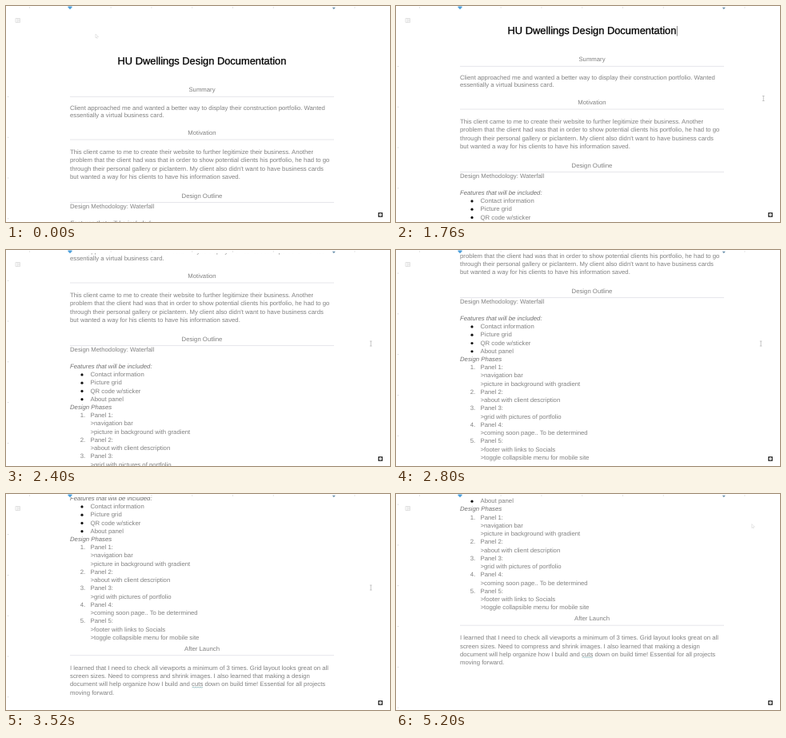
These frames come from a looping animation (480 by 270 pixels, 5280 ms). An HTML page:

```html
<!DOCTYPE html>
<html lang="en">
<head>
<meta charset="utf-8">
<title>Design Documentation</title>
<style>
  html, body { margin: 0; width: 100%; height: 100%; overflow: hidden; background: #fff; }
  svg { display: block; width: 480px; height: 270px; }
  text { font: 7.76px "Liberation Sans", Arial, sans-serif; fill: #808080;
         text-rendering: geometricPrecision; white-space: pre; }
  .title { font-size: 12.87px; fill: #000; stroke: #000; stroke-width: .3px; }
  .mid { text-anchor: middle; }
  .it { font-style: italic; fill: #707070; }
</style>
</head>
<body>
<svg viewBox="0 0 480 270">
  <clipPath id="view"><rect y="4" width="480" height="266"/></clipPath>
  <g clip-path="url(#view)">
    <g id="doc">
      <path d="M80 113.4h330M80 167h330M80 245.5h330M80 467.7h330" stroke="#e0e0e6" stroke-width=".8"/>
      <path d="M232.5 508l1.5-.7 1.5.7 1.5-.7 1.5.7 1.5-.7 1.5.7 1.5-.7 1.5.7 1.5-.7" fill="none" stroke="#7fb0b5" stroke-width=".7"/>
      <path id="caret" d="M351.4 63v12.5" stroke="#666" stroke-width=".8"/>
    </g>
  </g>
  <g id="ruler" fill="#ccc"></g>
  <path d="M77.5 .5h5v1.3L80 4.2 77.5 1.8z" fill="#4a9fdc"/>
  <path d="M407.8 1.8h4L409.8 4.2z" fill="#6a90ac"/>
  <path d="M12 15.5h5.5v5h-5.5zM14.2 15.5v5M15 17h2M15 18.8h2" fill="none" stroke="#d6d6d6" stroke-width=".7"/>
  <rect x="465" y="258" width="6" height="6" rx="1" fill="#4a4a4a"/>
  <path d="M468 259l.6 1.4 1.4.6-1.4.6-.6 1.4-.6-1.4-1.4-.6 1.4-.6z" fill="#fff" stroke="#fff" stroke-width=".5"/>
  <g id="pointer" fill="none" stroke-width=".7">
    <path id="beam" d="M-1.3-3h2.6M-1.3 3h2.6M0-3v6" stroke="#b0b0b0"/>
    <path id="arrow" d="M-1-3V2L.2 1 1.3 3M-1-3L2.6.6.2 1" stroke="#dcdcdc"/>
  </g>
</svg>
<script>
const LOOP = 5280, STEP = 80, LINE = 10.26;
const $ = id => document.getElementById(id);

function add(parent, tag, attrs, content = '') {
  const el = document.createElementNS('http://www.w3.org/2000/svg', tag);
  for (const key in attrs) el.setAttribute(key, attrs[key]);
  el.textContent = content;
  parent.appendChild(el);
  return el;
}

// y is the middle of the capitals
const text = (x, y, s, cls = '') => add($('doc'), 'text', { x, y: y + 2.4, class: cls }, s);
const lines = (x, y, list, gap = LINE) => list.forEach((s, i) => text(x, y + i * gap, s));
const heading = (y, s) => text(245, y, s, 'mid');

text(245, 70.8, 'HU Dwellings Design Documentation', 'title mid');
heading(105, 'Summary');
lines(80, 127.5, [
  'Client approached me and wanted a better way to display their construction portfolio. Wanted',
  'essentially a virtual business card.'], 9);
heading(159, 'Motivation');
lines(80, 182.8, [
  'This client came to me to create their website to further legitimize their business. Another',
  'problem that the client had was that in order to show potential clients his portfolio, he had to go',
  "through their personal gallery or piclantern. My client also didn't want to have business cards",
  'but wanted a way for his clients to have his information saved.']);
heading(238, 'Design Outline');
text(80, 250.6, 'Design Methodology: Waterfall');
text(80, 271.5, 'Features that will be included:', 'it');
const features = ['Contact information', 'Picture grid', 'QR code w/sticker', 'About panel'];
lines(105.5, 281.7, features);
features.forEach((_, i) => add($('doc'), 'circle', { cx: 95, cy: 281.9 + i * LINE, r: 1.6, fill: '#111' }));
text(80, 322.4, 'Design Phases', 'it');

let y = 332.6;
[['navigation bar', 'picture in background with gradient'],
 ['about with client description'],
 ['grid with pictures of portfolio'],
 ['coming soon page.. To be determined'],
 ['footer with links to Socials', 'toggle collapsible menu for mobile site']
].forEach((items, i) => {
  text(92.8, y, `${i + 1}.`);
  lines(105.5, y, [`Panel ${i + 1}:`, ...items.map(s => '>' + s)]);
  y += (items.length + 1) * LINE;
});

heading(459.3, 'After Launch');
lines(80, 483.4, [
  'I learned that I need to check all viewports a minimum of 3 times. Grid layout looks great on all',
  'screen sizes. Need to compress and shrink images. I also learned that making a design',
  'document will help organize how I build and cuts down on build time! Essential for all projects',
  'moving forward.']);

for (let i = -1; i < 8; i++) {
  if (i && i !== 6) add($('ruler'), 'rect', { x: 79.8 + i * 50.8, y: 1.5, width: 1, height: 1 });
}
const ticks = Array.from({ length: 10 }, () => add($('ruler'), 'rect', { x: 2, width: 1.2, height: .8 }));

// wheel bursts: start, duration, distance
const bursts = [[1470, 280, 38], [2030, 536, 114], [2670, 280, 76], [3230, 280, 38], [3790, 210, 37.5]];
// pointer: time, x, y
const path = [[0, 113, 38], [320, 405, 68], [400, 405, 68], [880, 467, 97], [960, 467, 97], [1200, 460.5, 113],
  [1760, 459.3, 115.5], [2400, 456.1, 117], [4080, 456.1, 117], [5200, 445.8, 40.5], [LOOP, 445.8, 40.5]];

const smooth = u => (u = Math.min(1, Math.max(0, u)), u * u * (3 - 2 * u));
const scrollAt = t => bursts.reduce((sum, [start, dur, dist]) => sum + dist * smooth((t - start) / dur), 0);

function pointerAt(t) {
  const i = path.findIndex(p => p[0] > t);
  const [t0, x0, y0] = path[i - 1], [t1, x1, y1] = path[i];
  const u = smooth((t - t0) / (t1 - t0));
  return [x0 + (x1 - x0) * u, y0 + (y1 - y0) * u];
}

const show = (id, on) => $(id).setAttribute('visibility', on ? 'visible' : 'hidden');

function draw(now) {
  const t = Math.floor((now % LOOP) / STEP) * STEP;
  const scroll = scrollAt(t), [px, py] = pointerAt(t);
  $('doc').setAttribute('transform', `translate(0 ${-scroll})`);
  ticks.forEach((el, i) => el.setAttribute('y', 113 + i * 50.8 - scroll));
  show('caret', (t >= 480 && t < 1040) || (t >= 1520 && t < 2080));
  $('pointer').setAttribute('transform', `translate(${px} ${py})`);
  show('arrow', py < 60);
  show('beam', py >= 60);
}

const begin = performance.now();
function tick() {
  draw(performance.now() - begin);
  requestAnimationFrame(tick);
}
tick();
</script>
</body>
</html>
```
